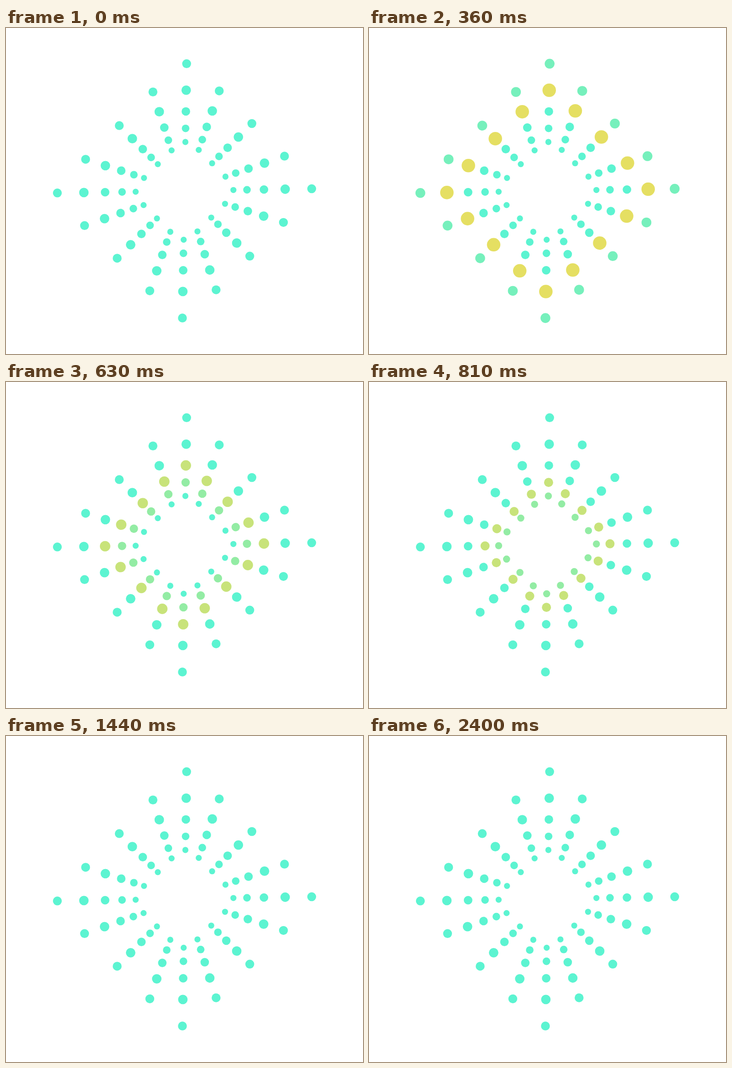
Animation, 783 px wide and 715 px high, one loop 2.43 s. Source, as an HTML page:

```html
<!DOCTYPE html>
<html lang="en">
<head>
<meta charset="utf-8">
<title>Dot burst</title>
<style>
  html, body { margin: 0; width: 100%; height: 100%; overflow: hidden; background: #fff; }
  svg { display: block; width: 783px; height: 715px; }
  circle {
    r: var(--rest);
    fill: #5cf4d1;
    animation: pulse 2430ms linear var(--delay) infinite;
  }
  /* 180 ms up, 180 ms down, then rest */
  @keyframes pulse {
    0%, 14.8148%, 100% { r: var(--rest); fill: #5cf4d1; }
    7.4074% { r: var(--peak); fill: #ffdb4d; }
  }
</style>
</head>
<body>
<svg viewBox="0 0 783 715"></svg>
<script>
  const NS = 'http://www.w3.org/2000/svg';
  const svg = document.querySelector('svg');
  const SIDES = [-1, -0.5, 0, 0.5, 1];
  const REST = [0.6, 0.8, 0.9, 1, 1];
  const PEAK = [1, 1.2, 1.2, 1.3, 1.5];
  const INSET = 5.95; // corners sit slightly inside the diamond

  function addRing(k) {
    const scale = 0.8 ** k;
    const size = 16.25 * scale;
    const ring = document.createElementNS(NS, 'g');
    ring.style.setProperty('--rest', size * REST[k] + 'px');
    ring.style.setProperty('--peak', size * PEAK[k] + 'px');
    ring.style.setProperty('--delay', 30 + 180 * k + 'ms');

    for (const a of SIDES) for (const b of SIDES) {
      if (Math.max(Math.abs(a), Math.abs(b)) < 1) continue;
      const inset = Math.abs(a * b) === 1 ? INSET : 0;
      const p = a * (147.7 * scale - inset);
      const q = b * (143.1 * scale - inset);
      const dot = document.createElementNS(NS, 'circle');
      dot.setAttribute('cx', 391.55 + p - q);
      dot.setAttribute('cy', 357.2 - p - q);
      ring.append(dot);
    }
    svg.append(ring);
  }

  REST.forEach((_, k) => addRing(k));
</script>
</body>
</html>
```
